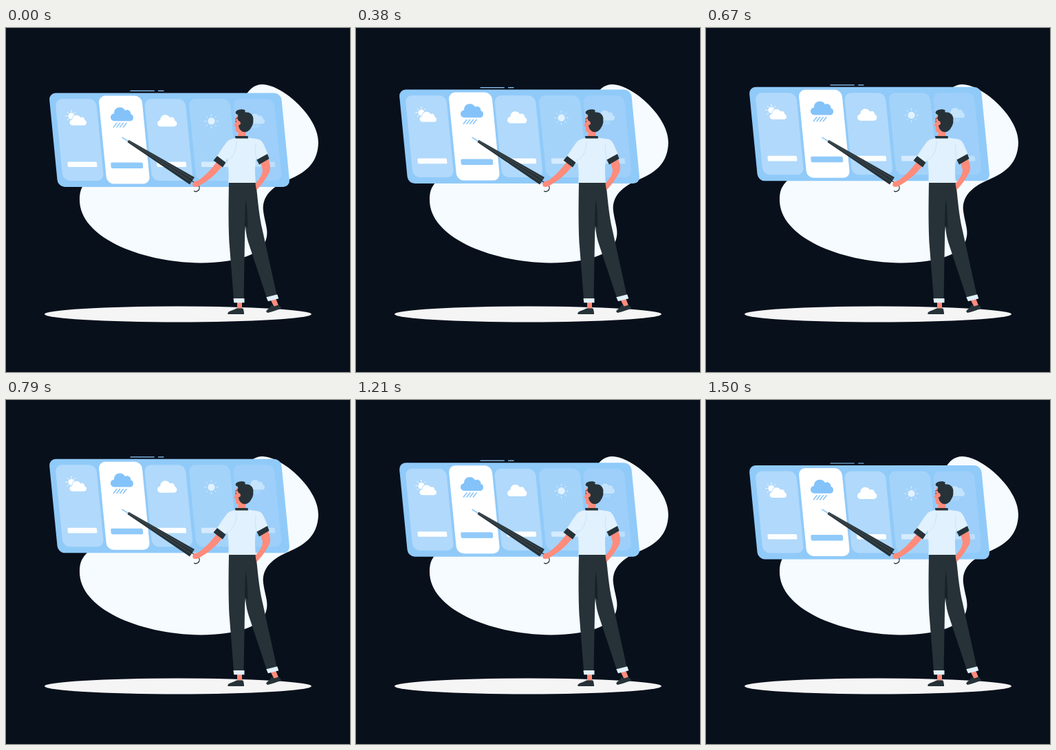
An HTML page for the animation above (1540 ms loop, 500 by 500 pixels).

```html
<!DOCTYPE html>
<html lang="en">
<head>
<meta charset="utf-8">
<title>Weather forecast</title>
<style>
  html, body { margin: 0; width: 100%; height: 100%; overflow: hidden; background: #08101c; }
  svg { display: block; width: 100vw; height: 100vh; }
  .dark { fill: #263238; }
  .skin { fill: #ff8b7b; }
  .pale { fill: #e1f1fd; }
  .line { fill: none; stroke-linecap: round; }
</style>
</head>
<body>
<svg viewBox="0 0 500 500">
  <defs>
    <path id="cloud" d="M6 20C2 20 0 17 0 14.5C0 11.5 2 9.5 5 9C5 3 9 0 13.5 0C17 0 19.5 1.5 21 4.5C25 2.5 29.5 5 29.5 10C32 10.5 33 12.5 33 15C33 18 31 20 27.5 20Z"/>
  </defs>

  <path fill="#f5fbff" d="M373 82C403 83 455 130 454 167C453 199 432 211 412 220C395 227 371 240 374 266C376 282 381 292 379 303C375 330 335 341 283 341.5C190 340 107 302 107 250C107 232 113 226 125 216C200 165 300 160 345 104C352 90 360 82 373 82Z"/>
  <ellipse cx="250" cy="416" rx="194" ry="11.4" fill="#f5f5f5"/>

  <g id="board">
    <path class="line" stroke="#90caf9" stroke-linecap="butt" stroke-width="1.2" d="M181 92H215.3M221.5 92H229"/>
    <g id="cards"></g>
    <g id="icons"></g>
  </g>

  <g id="umbrella">
    <path class="line" stroke="#90caf9" stroke-width="1.6" d="M169 159.3L179 165.3"/>
    <path class="dark" d="M178.5 162.8L274 217L267 227.5L176.5 166Z"/>
    <path class="line" stroke="#4b585e" stroke-width=".8" d="M179 164.3L272 219.5M178.5 165.2L269.5 223.5"/>
    <path class="line" stroke="#263238" stroke-width="1.3" d="M270 222L280 229C282 232 281 235 279 236.5C277 238 275 238 273.5 237"/>
  </g>

  <g id="legs">
    <path class="skin" d="M336 398H343V409H336ZM385 396L392 393L396 403L390 406Z"/>
    <path class="dark" d="M322 415C323 411 330 410.500 335 407.500H344.500C345.500 410 346 413 346 416H323Z"/>
    <path class="dark" d="M378 412C380 408 385 407 385.500 402.500L390 404.500L396 402.500C398 404 400 406 400 408C393 409.500 387 413 380 414Z"/>
    <path class="dark" d="M324 224H363C366 247 367 270 373 295L393.500 388L379 392L352 311C349 301 348 291 347.500 280L345.500 394H331L325 318C323 290 323.500 250 324 224Z"/>
    <path fill="#192226" d="M348.500 248C351 262 351 276 351.500 291L348 287L346.500 300C347 282 347 266 348.500 248Z"/>
    <path class="pale" d="M330.500 393H346.500V399.300H331.300ZM378.300 391.300L394.300 387.300L396.300 393.300L381 397.300Z"/>
  </g>

  <g id="body">
    <path class="skin" d="M370 196L381 190C385 200 385 207 381 213C376 222 370 230 364 235.500L362.500 226C367 221 373 214 373 206Z"/>
    <path class="skin" d="M306 195L314 201C306 212 294 222 283 228C280 231 275 231.500 272.500 230.500C270.500 228 271 225 274 223L279.500 221.800C289 215 298 206 306 195Z"/>
    <path class="pale" d="M334 159.500H352L366 161.500C371 162.500 373 166 375 170L381 184L366 193L364 189C361 200 362 213 363 225H323C325 210 322 197 322 189L318 196L306 187C312 179 317 170 322 164.500C325 161.500 330 161 334 159.500Z"/>
    <path class="line" stroke="#c6e2f9" stroke-width=".9" d="M335 165C335 178 330 188 322 193M364 189C362 182 362 175 363 169"/>
    <path class="dark" d="M307 186L319.500 195.500L315 202.500L301.500 192.500ZM364.500 191.500L380 183L382.500 190L368 198.500Z"/>
  </g>

  <g id="head">
    <path class="skin" d="M337 126C334 129 333 132 333.500 136L331.500 142L333.500 143.500C333 149 335 152.500 338 152L336 158H348L349 149L340 128Z"/>
    <path class="dark" d="M333 157H351.500L352 160.500H333.500Z"/>
    <path class="dark" d="M334 121.500C337 117.500 346 117.500 348 120C346.500 121.500 347 122.500 349 122.500C355 122 360.500 127 359.300 134C360 140 356.500 144 355 147C351 152 345 152.500 341.500 149C338 146 338 142 338 139C340 137 340 135 338 135L336 131C338 128 337 127 337 126C334 125 333 123.500 334 121.500Z"/>
    <circle class="skin" cx="338" cy="138.300" r="2.900"/>
    <path class="line" stroke="#263238" stroke-width=".9" d="M333.600 132.200L335.500 131.300M334.100 135V136.600"/>
  </g>
</svg>
<script>
const NS = "http://www.w3.org/2000/svg";
const LOOP = 1540, STEPS = 37, LIFT = 10;
const BLUE = "#90caf9", SLANT = 0.0977, TOP = 95;
const board = document.getElementById("board");
const cards = document.getElementById("cards");
const icons = document.getElementById("icons");

function add(parent, tag, attrs) {
  const el = document.createElementNS(NS, tag);
  for (const key in attrs) el.setAttribute(key, attrs[key]);
  parent.appendChild(el);
  return el;
}

function rect(x, y, width, height, rx, fill) {
  add(cards, "rect", { x, y, width, height, rx, fill });
}

function cloud(x, y, scale, fill, extra) {
  add(icons, "use", {
    href: "#cloud", fill, transform: `translate(${x} ${y}) scale(${scale})`, ...extra
  });
}

function sun(cx, cy, r, reach, fill, from = 0, count = 8) {
  add(icons, "circle", { cx, cy, r, fill });
  let d = "";
  for (let i = from; i < from + count; i++) {
    const c = Math.cos(i * Math.PI / 4), s = Math.sin(i * Math.PI / 4);
    const inner = reach - 2;
    d += `M${cx + c * inner} ${cy + s * inner}L${cx + c * reach} ${cy + s * reach}`;
  }
  add(icons, "path", { d, class: "line", stroke: fill, "stroke-width": 1 });
}

function rain(x, y, count, gap, w, h, stroke, width) {
  let d = "";
  for (let i = 0; i < count; i++) d += `M${x + i * gap} ${y}l${-w} ${h}`;
  add(icons, "path", { d, class: "line", stroke, "stroke-width": width });
}

// Slanted panel, cards and label bars
cards.setAttribute("transform", `matrix(1 0 ${SLANT} 1 ${-SLANT * TOP} 0)`);
rect(62.2, TOP, 337.4, 136.5, 10, BLUE);
rect(70.4, 103.5, 59.6, 119, 10, "#b1d9fb");
rect(133.8, 99, 62.8, 128, 10, "#fff");
rect(199.9, 103.5, 59.6, 119, 10, "#b0d9fb");
rect(264.4, 103.5, 59.8, 119, 10, "#a4d3fa");
rect(328.8, 103.5, 59.8, 119, 10, "#9dcffa");
[[79.5, "#fcfeff"], [209.2, "#fcfeff"], [273.8, "#d6ebfd"], [338.2, "#bcdffc"]]
  .forEach(([x, fill]) => rect(x, 195, 42.6, 7.6, 1.5, fill));
rect(142.2, 196, 46.6, 8.5, 2, BLUE);

// Weather symbols
sun(95, 128.5, 4.6, 8.3, "#fff", 3, 5);
cloud(92.6, 127.2, 0.74, "#fff", { stroke: "#b1d9fb", "stroke-width": 2.6, "paint-order": "stroke" });
cloud(152, 115.7, 1, "#84c3f9");
rain(161, 138.7, 4, 4.7, 4.7, 6, "#84c3f9", 1.5);
cloud(220, 126.7, 0.86, "#fff");
sun(298.5, 136, 5.1, 9.8, "#e3f2fe");
cloud(352, 125.2, 0.73, "#c4e3fc");
rain(358.5, 141.5, 4, 3.4, 3, 4, "#c4e3fc", 1);

function draw(now) {
  const step = Math.floor(((now % LOOP) + 3) / (LOOP / STEPS));
  const phase = ((step + 1) % STEPS) / STEPS;
  const y = -LIFT * (1 - Math.abs(1 - 2 * phase));
  board.setAttribute("transform", `translate(0 ${y.toFixed(3)})`);
}

const start = performance.now();
function tick() {
  draw(performance.now() - start);
  requestAnimationFrame(tick);
}
draw(0);
requestAnimationFrame(tick);
</script>
</body>
</html>
```
